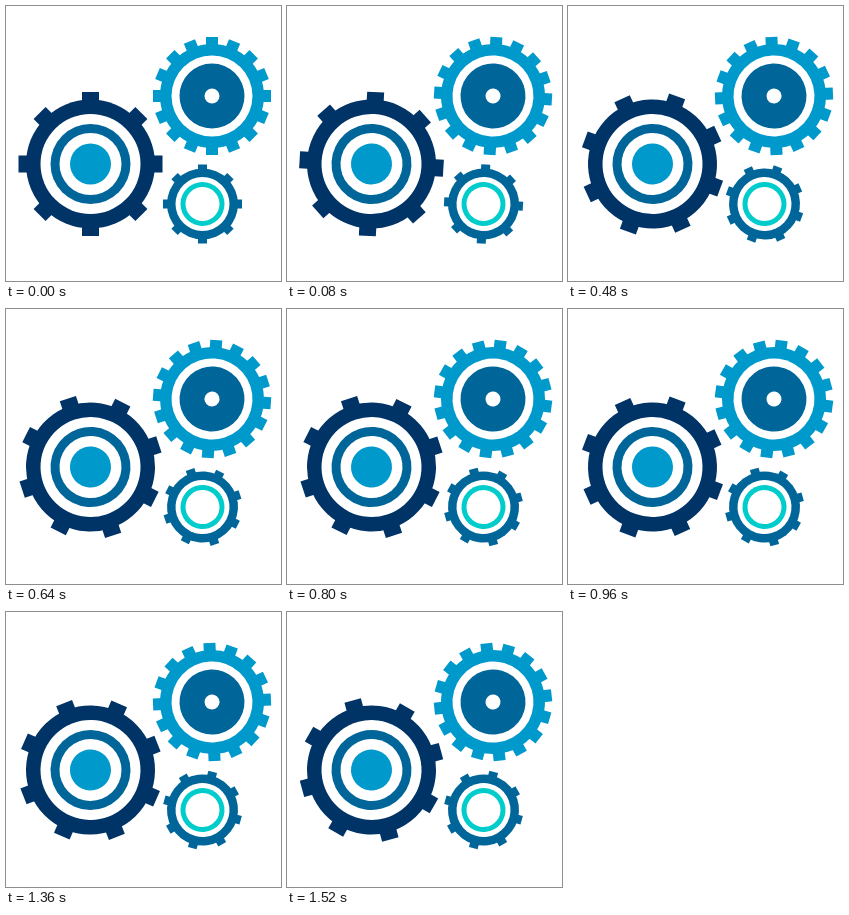
These frames come from a looping animation (275x275 px, 1600 ms). An HTML page with a canvas:

```html
<!DOCTYPE html>
<html>
<head>
<meta charset="utf-8">
<style>
  html, body { margin: 0; height: 100%; overflow: hidden; background: #fff; }
  canvas { display: block; }
</style>
</head>
<body>
<canvas id="stage" width="275" height="275"></canvas>
<script>
const ctx = document.getElementById('stage').getContext('2d');
const LOOP = 1600, STEP = 80;
const NAVY = '#003366', BLUE = '#006699', SKY = '#0099cc', AQUA = '#00cccc', WHITE = '#fff';

// Rings are [radius, colour] from the outside in; swing holds the turning points as [step, degrees].
const gears = [
  { x: 84.5, y: 158, teeth: 8, tip: 72, width: 17, swing: [[0, 0], [9, 30], [14, 14], [20, 33]],
    rings: [[64.5, NAVY], [50, WHITE], [40, BLUE], [31, WHITE], [20.5, SKY]] },
  { x: 206, y: 90, teeth: 16, tip: 59, width: 12, swing: [[0, 0], [9, 30], [12, 30], [20, 14]],
    rings: [[52, SKY], [40.5, WHITE], [32.5, BLUE], [7.5, WHITE]] },
  { x: 196.5, y: 198, teeth: 8, tip: 39.5, width: 9, swing: [[0, 0], [9, 30], [12, 30], [15, 15], [20, 15]],
    rings: [[35.5, BLUE], [27, WHITE], [22, AQUA], [17, WHITE]] },
];

function angleAt(swing, step) {
  const next = swing.findIndex(([end]) => end > step);
  const [start, from] = swing[next - 1], [end, to] = swing[next];
  return (from + (to - from) * (step - start) / (end - start)) * Math.PI / 180;
}

function drawGear({ x, y, teeth, tip, width, rings, swing }, step) {
  ctx.save();
  ctx.translate(x, y);
  ctx.rotate(angleAt(swing, step));
  ctx.fillStyle = rings[0][1];
  for (let i = 0; i < teeth; i++) {
    ctx.fillRect(-width / 2, -tip, width, tip);
    ctx.rotate(2 * Math.PI / teeth);
  }
  for (const [radius, colour] of rings) {
    ctx.fillStyle = colour;
    ctx.beginPath();
    ctx.arc(0, 0, radius, 0, 2 * Math.PI);
    ctx.fill();
  }
  ctx.restore();
}

function draw(now) {
  const step = Math.floor(now % LOOP / STEP);
  ctx.fillStyle = WHITE;
  ctx.fillRect(0, 0, 275, 275);
  for (const gear of gears) drawGear(gear, step);
  requestAnimationFrame(draw);
}
requestAnimationFrame(draw);
</script>
</body>
</html>
```
